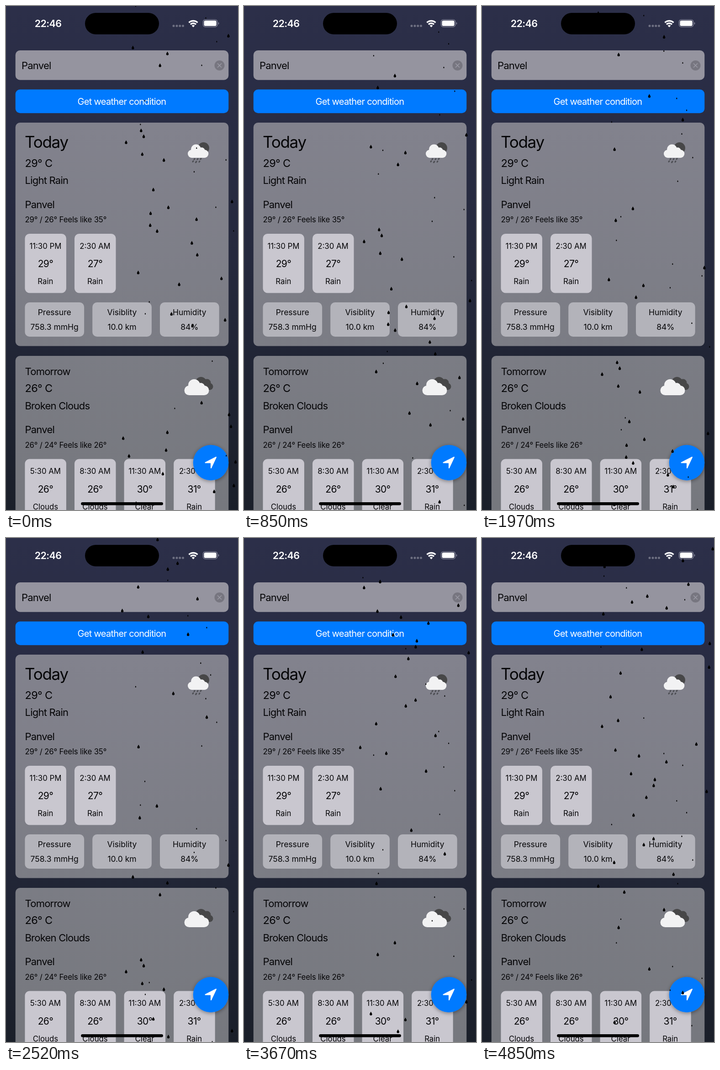
Write an HTML page that moves like this. It is 508 px wide and 1102 px high and loops after 4.88 s.

```html
<!DOCTYPE html>
<html lang="en">
<head>
<meta charset="utf-8">
<title>Weather</title>
<style>
  html, body { margin: 0; width: 100%; height: 100%; overflow: hidden; background: #20232f; }
  svg { display: block; width: 508px; height: 1102px; font-family: Inter, Roboto, sans-serif; fill: #050507; }
  .mid { text-anchor: middle; }
  .title { font-size: 35px; letter-spacing: -.035em; }
  .temp { font-size: 23.5px; letter-spacing: -.03em; }
  .body { font-size: 22px; letter-spacing: -.035em; }
  .feels { font-size: 16.8px; letter-spacing: -.01em; }
  .hour { font-size: 16.8px; }
  .deg { font-size: 21px; letter-spacing: -.03em; }
  .stat { font-size: 17.5px; }
  .button { font-size: 20px; letter-spacing: -.035em; fill: #fff; }
  .clock { font-size: 21.5px; letter-spacing: -.03em; font-weight: 600; fill: #fff; }
</style>
</head>
<body>
<svg viewBox="0 0 508 1102">
  <defs>
    <linearGradient id="sky" x2="0" y2="1">
      <stop stop-color="#2c2f49"/><stop offset=".5" stop-color="#25293d"/><stop offset="1" stop-color="#1a1f29"/>
    </linearGradient>
    <linearGradient id="panel" x2="0" y2="1102" gradientUnits="userSpaceOnUse">
      <stop offset=".23" stop-color="#82828d"/><stop offset="1" stop-color="#76787e"/>
    </linearGradient>
    <filter id="shadow" x="-30%" y="-30%" width="160%" height="160%">
      <feDropShadow dx="0" dy="2" stdDeviation="4" flood-opacity=".4"/>
    </filter>
    <path id="drop" d="M0-4.2C.7-2.2 2.7-.4 2.7 1.5A2.7 2.6 0 0 1-2.7 1.5C-2.7-.4-.7-2.2 0-4.2Z"/>
    <use id="dot" href="#drop" transform="scale(.45)"/>
    <g id="cloud">
      <circle cx="10.5" cy="24.5" r="10.5"/><circle cx="21.5" cy="13" r="13"/>
      <circle cx="36" cy="17" r="9"/><circle cx="43.500" cy="24.5" r="10.5"/>
      <rect x="10.5" y="16" width="33" height="19"/>
    </g>
  </defs>

  <rect width="508" height="1102" fill="url(#sky)"/>
  <g id="page"></g>

  <g id="rainIcon">
    <circle cx="432.5" cy="310.5" r="12.5" fill="#474748"/>
    <use href="#cloud" transform="translate(398 302.5) scale(.84)" fill="#f2f2f3"/>
    <path d="M413 334l-1 1.5M420 334l-1 1.5M427 333.5l-1 1.5M410 339l-1 1.5M417 340l-1.5 2M424 339.5l-1 1.5" stroke="#4c4d52" stroke-width="3" stroke-linecap="round"/>
  </g>
  <g id="cloudIcon">
    <g fill="#474748">
      <circle cx="427" cy="823" r="12"/><circle cx="440" cy="824" r="8.5"/>
      <circle cx="446" cy="832" r="7.5"/><rect x="420" y="824" width="26" height="15.5"/>
    </g>
    <use href="#cloud" x="390.5" y="816" fill="#f2f2f3"/>
  </g>

  <g id="statusBar">
    <rect x="173" y="15" width="162" height="47" rx="23.5" fill="#000"/>
    <text x="92" y="46" class="clock mid">22:46</text>
    <path d="M367 43.5h.01M374 43.5h.01M380.8 43.5h.01M387.5 43.5h.01" stroke="#6e7082" stroke-width="5" stroke-linecap="round"/>
    <path d="M400.5 36.3a13.8 13.8 0 0 1 19 0M404 40.2a8.6 8.6 0 0 1 12 0" fill="none" stroke="#fff" stroke-width="3.4"/>
    <path d="M406.7 43a5 5 0 0 1 6.6 0L410 46.5Z" fill="#fff"/>
    <rect x="431.5" y="29.8" width="31.3" height="16" rx="5" fill="none" stroke="#85879a" stroke-width="1.3"/>
    <rect x="433.5" y="31.8" width="27.2" height="12" rx="3.4" fill="#fff"/>
    <path d="M464.7 35.2a3 3 0 0 1 0 5.5Z" fill="#85879a"/>
  </g>

  <circle cx="448.5" cy="998.5" r="38.8" fill="#027aff" filter="url(#shadow)"/>
  <path d="M460 986.5L449 1010V998.5H436.5Z" fill="#fff" stroke="#fff" stroke-width="2" stroke-linejoin="round"/>
  <rect x="164.2" y="1085" width="179.7" height="6.5" rx="3.2" fill="#000"/>

  <g id="drops" fill="#000"></g>
  <g id="dots" fill="#000"></g>
</svg>
<script>
const el = id => document.getElementById(id);
const box = (x, y, w, h, fill, r = 10) =>
  `<rect x="${x}" y="${y}" width="${w}" height="${h}" rx="${r}" fill="${fill}"/>`;
const wide = (y, h, fill) => box(20.7, y, 466.6, h, fill);
const text = (x, y, style, s) => `<text x="${x}" y="${y}" class="${style}">${s}</text>`;

const hours = (y, list) => list.map(([time, deg, sky], i) => {
  const x = 41.4 + i * 108.6, mid = x + 45;
  return box(x, y, 90.5, 129.5, '#c9c7cf') + text(mid, y + 32.5, 'hour mid', time) +
    text(mid, y + 73, 'deg mid', deg) + text(mid, y + 110, 'hour mid', sky);
}).join('');

const stats = list => list.map(([name, value], i) => {
  const x = 41.4 + i * 147.8, mid = x + 64.8;
  return box(x, 648, 129.7, 75, '#b3b3ba') + text(mid, 676, 'stat mid', name) +
    text(mid, 708, 'stat mid', value);
}).join('');

// Everything below the heading of a day, starting at the temperature's baseline.
const day = (y, temp, sky, feels, list) =>
  text(41.5, y, 'temp', temp) + text(41.5, y + 37.7, 'body', sky) +
  text(41.5, y + 90, 'body', 'Panvel') + text(41.5, y + 121.5, 'feels', feels) +
  hours(y + 146.5, list);

el('page').innerHTML =
  wide(97, 64.7, '#95949f') + text(34, 138, 'body', 'Panvel') +
  '<circle cx="467.5" cy="130" r="11" fill="#777680"/>' +
  '<path d="M463.5 126l8 8m0-8l-8 8" stroke="#9a99a4" stroke-width="1.7" stroke-linecap="round"/>' +
  wide(182.5, 51.7, '#007aff') + text(253.5, 216, 'button mid', 'Get weather condition') +
  wide(255, 488.5, 'url(#panel)') + text(41, 310, 'title', 'Today') +
  day(351.5, '29° C', 'Light Rain', '29° / 26° Feels like 35°',
    [['11:30 PM', '29°', 'Rain'], ['2:30 AM', '27°', 'Rain']]) +
  stats([['Pressure', '758.3 mmHg'], ['Visiblity', '10.0 km'], ['Humidity', '84%']]) +
  wide(765, 400, 'url(#panel)') + text(41.5, 807, 'body', 'Tomorrow') +
  day(844, '26° C', 'Broken Clouds', '26° / 24° Feels like 26°',
    [['5:30 AM', '26°', 'Clouds'], ['8:30 AM', '26°', 'Clouds'],
      ['11:30 AM', '30°', 'Clear'], ['2:30 PM', '31°', 'Rain']]);

// Drops are born at a steady rate, spread at random from mid-screen to beyond the right edge.
const random = n => Math.abs(Math.sin(n * 12.9898) * 43758.5453) % 1;
const rain = (shape, count, y, gap, seed) => Array.from({ length: count }, (_, i) =>
  `<use href="#${shape}" x="${254 + 540 * random(seed + i)}" y="${y - gap * i}"/>`).join('');
el('drops').innerHTML = rain('drop', 184, 1100, 12.94, 1);
el('dots').innerHTML = rain('dot', 66, 983, 25.87, 501);

const LOOP = 4880, FALL = 13 / 3;
function draw() {
  const t = performance.now() % LOOP;
  const frame = Math.floor((t + 5) * .033);   // 33 pictures a second
  const fall = Math.floor(frame * 1.81) * FALL;
  el('drops').setAttribute('transform', `translate(0 ${fall})`);
  el('dots').setAttribute('transform', `translate(0 ${fall / 2})`);
  requestAnimationFrame(draw);
}
draw();
</script>
</body>
</html>
```
